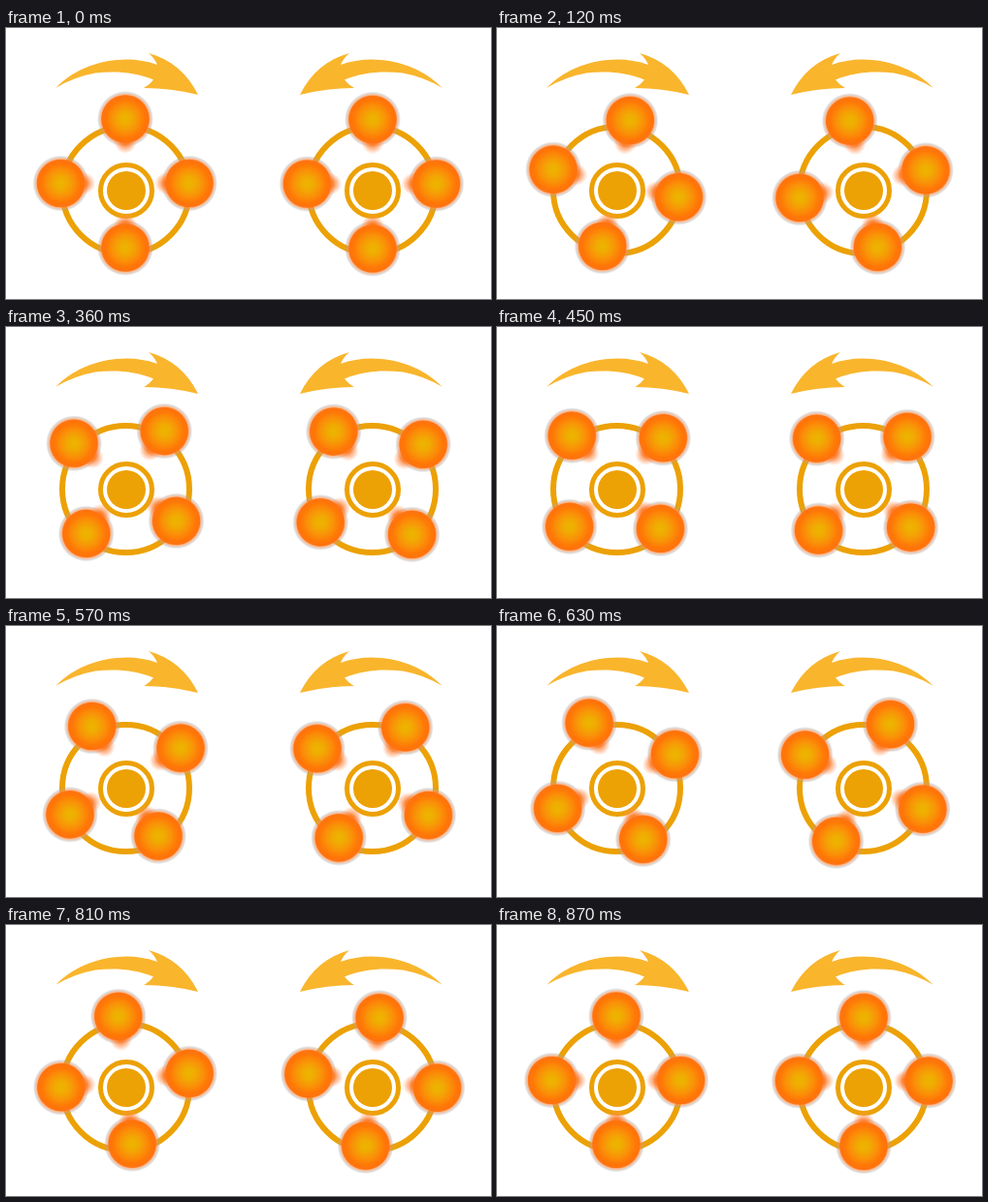
Write an HTML page that moves like this. It is 500 px wide and 280 px high and loops after 900 ms.

```html
<!DOCTYPE html>
<html lang="en">
<head>
<meta charset="utf-8">
<title>Counter-rotating rings</title>
<style>
  html, body { margin: 0; width: 100%; height: 100%; overflow: hidden; background: #fff; }
  svg { display: block; width: 500px; height: 280px; }
</style>
</head>
<body>
<svg viewBox="0 0 500 280" xmlns="http://www.w3.org/2000/svg">
  <defs>
    <radialGradient id="body">
      <stop offset="0" stop-color="#ecb500"/>
      <stop offset=".25" stop-color="#f0ab02"/>
      <stop offset=".55" stop-color="#f99208"/>
      <stop offset=".82" stop-color="#ff7706"/>
      <stop offset="1" stop-color="#ff7212"/>
    </radialGradient>
    <radialGradient id="halo">
      <stop offset=".82" stop-color="#ff7818" stop-opacity=".95"/>
      <stop offset=".88" stop-color="#f59050" stop-opacity=".6"/>
      <stop offset=".94" stop-color="#b0a49c" stop-opacity=".4"/>
      <stop offset="1" stop-color="#a0a0a0" stop-opacity="0"/>
    </radialGradient>
    <radialGradient id="tail">
      <stop offset="0" stop-color="#ff7410"/>
      <stop offset=".4" stop-color="#ff7a22" stop-opacity=".9"/>
      <stop offset=".7" stop-color="#ff8a48" stop-opacity=".5"/>
      <stop offset="1" stop-color="#ff9a60" stop-opacity="0"/>
    </radialGradient>
    <!-- one ball, with its glow pointing down towards the pivot -->
    <g id="ball">
      <circle r="29" fill="url(#halo)"/>
      <ellipse cy="20" rx="12.500" ry="16" fill="url(#tail)"/>
      <circle r="24.600" fill="url(#body)"/>
    </g>
    <path id="arrow" fill="#f9b52c" d="M51 62C72 41 98 33 124 32.5Q141 32.5 156 38Q153 31 147 26C170 32 187 47 198 69Q170 62 142 62Q148 59 152 53.500C134 45.500 112 44 92 46.500Q70 50.500 51 62Z"/>
    <g id="wheel">
      <circle cx="123.500" cy="167.500" r="65.500" fill="none" stroke="#eca105" stroke-width="6"/>
      <circle cx="124" cy="168" r="26.500" fill="#fff" stroke="#eca105" stroke-width="5"/>
      <circle cx="124" cy="168" r="20" fill="#eca105"/>
    </g>
  </defs>
  <use href="#arrow"/>
  <use href="#arrow" transform="translate(501 0) scale(-1 1)"/>
  <use href="#wheel"/>
  <use href="#wheel" x="254"/>
  <g id="left"></g>
  <g id="right"></g>
</svg>
<script>
  const LOOP = 900, STEP = 30, LAST = LOOP / STEP - 1;
  const $ = id => document.getElementById(id);

  // pivot, direction of spin, ball distances: top, right, bottom, left
  const rotors = [
    { el: $('left'), x: 123, y: 160.5, dir: 1, arms: [66.5, 66, 66.5, 66.5] },
    { el: $('right'), x: 378, y: 161, dir: -1, arms: [66.5, 65.5, 67, 67.5] }
  ];

  for (const { el, arms } of rotors) {
    el.innerHTML = arms.map((r, i) =>
      `<use href="#ball" transform="rotate(${i * 90}) translate(0 ${-r})"/>`).join('');
  }

  function draw(ms) {
    const step = Math.floor((ms % LOOP) / STEP);
    const angle = 90 * step / LAST;
    for (const { el, x, y, dir } of rotors) {
      el.setAttribute('transform', `translate(${x} ${y}) rotate(${dir * angle})`);
    }
  }

  function tick() {
    draw(performance.now());
    requestAnimationFrame(tick);
  }

  draw(0);
  requestAnimationFrame(tick);
</script>
</body>
</html>
```
